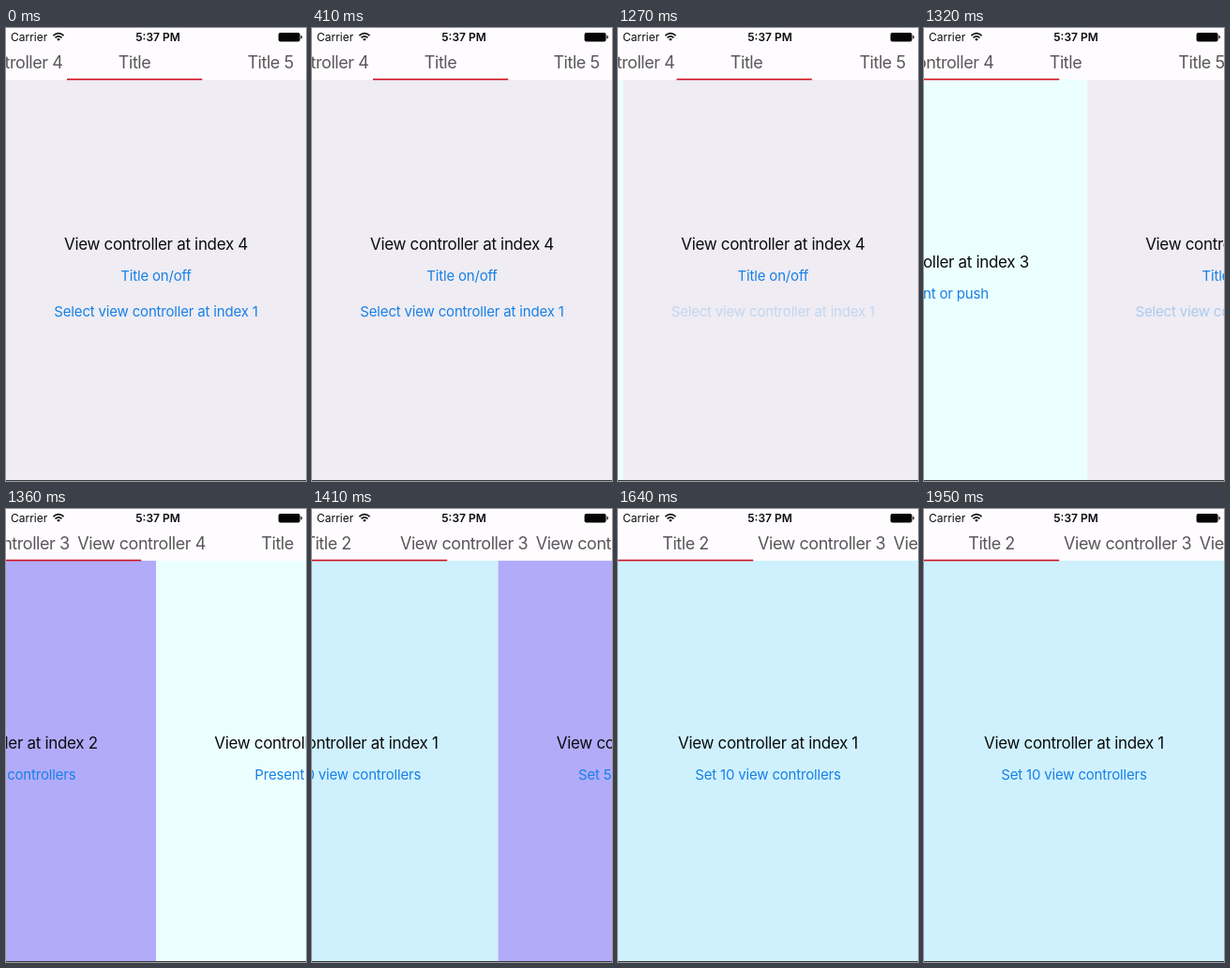
An HTML page for the animation above (1.99 s loop, 320 px wide and 482 px high).

```html
<!DOCTYPE html>
<html lang="en">
<head>
<meta charset="utf-8">
<title>Paged tabs</title>
<style>
  html, body { margin: 0; width: 100%; height: 100%; overflow: hidden; background: #fefcfe; }
  svg { display: block; width: 100%; height: 100%; }
  text { font-family: Inter, Roboto, "Liberation Sans", sans-serif; text-anchor: middle; fill: #0c0c0e; }
  .heading { font-size: 17px; letter-spacing: -.32px; }
  .button { font-size: 15px; letter-spacing: -.18px; fill: #1780e6; }
  .tab { font-size: 18px; letter-spacing: -.45px; fill: #5a575b; }
  .status { font-size: 12px; }
</style>
</head>
<body>
<svg id="stage" viewBox="0 0 320 482">
  <rect width="320" height="482" fill="#fefcfe"/>
  <g id="pages"></g>
  <g id="tabs"></g>
  <rect id="indicator" y="53.8" height="1.6" fill="#d0101e"/>
  <rect y="481" width="320" height="1" fill="#3a393c"/>
  <text class="status" x="5" y="14" style="text-anchor:start">Carrier</text>
  <text class="status" x="162" y="14" font-weight="600">5:37 PM</text>
  <g fill="none" stroke="#111" stroke-width="1.7">
    <path d="M50.4 8.2Q56 3.2 61.6 8.2M52.5 10.4Q56 7.2 59.5 10.4"/>
    <path d="M54.1 11.9Q56 10.3 57.9 11.9L56 13.8Z" fill="#111" stroke="none"/>
  </g>
  <rect x="290.6" y="5" width="23" height="9.4" rx="2" fill="#050505"/>
  <path d="M314.3 7.8a1.8 1.9 0 0 1 0 3.8z" fill="#333"/>
</svg>
<script>
const LOOP = 1990, TICK = 1000 / 22;
const PAGE_WIDTH = 320, TAB_WIDTH = 144.2, TAB_PITCH = 145, MAX_TAB_SCROLL = 515;
const PRESS = 590, RELEASE = 1270;
const SLIDE = { start: 1259.4, duration: 201.2, from: 4, to: 1 };

const tabTitles = ["Title 1", "Title 2", "View controller 3", "View controller 4", "Title", "Title 5"];
const pageSpecs = [
  { index: 1, color: "#cff1fe", y: 254.5, buttons: ["Set 10 view controllers"] },
  { index: 2, color: "#b2abfa", y: 254.5, buttons: ["Set 5 view controllers"] },
  { index: 3, color: "#ecffff", y: 254.5, buttons: ["Present or push"] },
  { index: 4, color: "#efecf3", y: 235.5, buttons: ["Title on/off", "Select view controller at index 1"] }
];

const byId = id => document.getElementById(id);

function add(parent, tag, attrs, content = "") {
  const node = document.createElementNS("http://www.w3.org/2000/svg", tag);
  for (const name in attrs) node.setAttribute(name, attrs[name]);
  node.textContent = content;
  return parent.appendChild(node);
}

const label = (parent, kind, x, y, content) =>
  add(parent, "text", { class: kind, x, y }, content);

let selectButton;
for (const { index, color, y, buttons } of pageSpecs) {
  const left = index * PAGE_WIDTH, center = left + PAGE_WIDTH / 2;
  add(byId("pages"), "rect", { x: left, y: 55, width: PAGE_WIDTH, height: 427, fill: color });
  label(byId("pages"), "heading", center, y, "View controller at index " + index);
  buttons.forEach((title, i) => {
    selectButton = label(byId("pages"), "button", center, y + 33.2 + 38 * i, title);
  });
}
tabTitles.forEach((title, i) => label(byId("tabs"), "tab", i * TAB_PITCH + TAB_WIDTH / 2, 43.3, title));
byId("indicator").setAttribute("width", TAB_WIDTH);

const clamp = v => Math.min(1, Math.max(0, v));
const easeInOut = x => x < .5 ? 2 * x * x : 1 - 2 * (1 - x) ** 2;
const tickTime = n => Math.round(n * TICK / 10) * 10;

// The screen refreshes 22 times a second, on whole hundredths.
function snap(time) {
  const n = Math.floor((time + 5) / TICK);
  return tickTime(n) > time ? tickTime(n - 1) : tickTime(n);
}

function buttonOpacity(time) {
  if (time < PRESS) return 1;
  return .2 + .8 * clamp((time - RELEASE) / 350);
}

function render(time) {
  const progress = easeInOut(clamp((time - SLIDE.start) / SLIDE.duration));
  const position = SLIDE.from + (SLIDE.to - SLIDE.from) * progress;
  const tabScroll = Math.min(MAX_TAB_SCROLL, position * TAB_PITCH);
  byId("pages").setAttribute("transform", `translate(${-position * PAGE_WIDTH})`);
  byId("tabs").setAttribute("transform", `translate(${-tabScroll})`);
  byId("indicator").setAttribute("x", position * TAB_PITCH - tabScroll);
  selectButton.setAttribute("opacity", buttonOpacity(time));
}

const startTime = performance.now();
function frame() {
  render(snap((performance.now() - startTime) % LOOP));
  requestAnimationFrame(frame);
}
frame();
</script>
</body>
</html>
```
